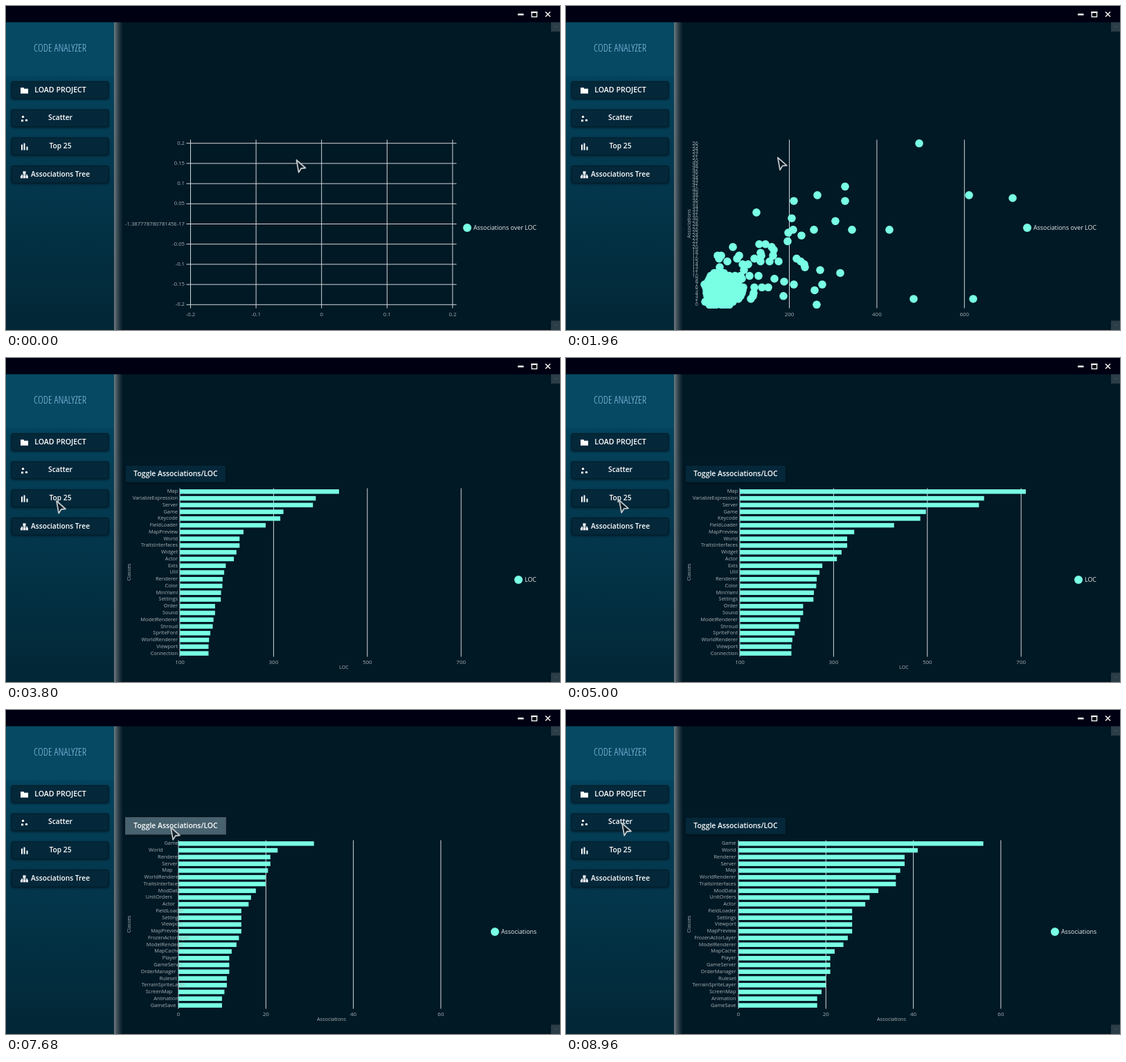
Animation of 800x469 px, one loop 9 s. Source, as an HTML page with a canvas:

```html
<!DOCTYPE html>
<html lang="en">
<head>
<meta charset="utf-8">
<title>Code Analyzer</title>
<style>
html, body { margin: 0; width: 100%; height: 100%; overflow: hidden; background: #011925; }
canvas { display: block; }
</style>
</head>
<body>
<canvas id="stage" width="800" height="469"></canvas>
<script>
const ctx = document.getElementById('stage').getContext('2d');
const LOOP = 9000, GROW = 300;
const MINT = '#79ffe4', GREY = '#a9b1b6', LINE = '#d0d6d9';
const SANS = '"Open Sans", "Noto Sans", sans-serif';
const SCATTER_AT = 876, BARS_VIEW_AT = 3430, BARS_AT = 3634, TOGGLE_AT = 7515;

const clamp = v => Math.max(0, Math.min(1, v));
const lerp = (a, b, p) => a + (b - a) * p;
const progress = (t, start, length = GROW) => clamp((t - start) / length);
const smooth = p => p * p * (3 - 2 * p);

function rect(x, y, w, h, fill) {
  ctx.fillStyle = fill;
  ctx.fillRect(x, y, w, h);
}
function line(x1, y1, x2, y2, color = LINE, width = 1) {
  ctx.strokeStyle = color;
  ctx.lineWidth = width;
  ctx.beginPath();
  ctx.moveTo(x1, y1);
  ctx.lineTo(x2, y2);
  ctx.stroke();
}
function dot(x, y, r, fill = MINT) {
  ctx.fillStyle = fill;
  ctx.beginPath();
  ctx.arc(x, y, r, 0, 7);
  ctx.fill();
}
function text(str, x, y, size, color = GREY, align = 'center', weight = 400) {
  ctx.font = `${weight} ${size}px ${SANS}`;
  ctx.fillStyle = color;
  ctx.textAlign = align;
  ctx.textBaseline = 'middle';
  ctx.fillText(str, x, y);
}
function sideTitle(str, y) {
  ctx.save();
  ctx.translate(178, y);
  ctx.rotate(-Math.PI / 2);
  text(str, 0, 0, 7.3);
  ctx.restore();
}
function faded(alpha, draw) {
  ctx.save();
  ctx.globalAlpha = alpha;
  draw();
  ctx.restore();
}
function gradient(x1, y1, x2, y2, from, to) {
  const g = ctx.createLinearGradient(x1, y1, x2, y2);
  g.addColorStop(0, from);
  g.addColorStop(1, to);
  return g;
}
function button(x, y, w, h, label, size) {
  ctx.save();
  ctx.shadowColor = 'rgba(0,8,14,.8)';
  ctx.shadowBlur = 4;
  ctx.shadowOffsetY = 1;
  ctx.fillStyle = '#04283a';
  ctx.beginPath();
  ctx.roundRect(x, y, w, h, 1.5);
  ctx.fill();
  ctx.restore();
  ctx.strokeStyle = '#021c29';
  ctx.lineWidth = 1;
  ctx.stroke();
  if (label) text(label, x + w / 2 + .5, y + h / 2, size, '#fff', 'center', 600);
}

// Window frame and sidebar
const icons = [
  y => {
    rect(21, y - 4, 5, 3, '#fff');
    rect(21, y - 2.5, 11, 7, '#fff');
  },
  y => [[24.5, -2.5], [23.5, 3], [29.5, 2.5]].forEach(([x, dy]) => dot(x, y + dy, 1.7, '#fff')),
  y => [[22, 8], [25.5, 10], [29.5, 5]].forEach(([x, h]) => rect(x, y + 5 - h, 2, h, '#fff')),
  y => {
    rect(24.5, y - 5, 4, 4, '#fff');
    [21, 24.8, 28.6].forEach(x => rect(x, y + 1.5, 3.2, 3.5, '#fff'));
    rect(26, y - 2, 1, 4, '#fff');
    rect(22, y, 9, 1, '#fff');
    rect(22, y, 1, 2, '#fff');
    rect(30, y, 1, 2, '#fff');
  }
];

function drawFrame() {
  rect(0, 0, 800, 469, '#011925');
  rect(156, 23, 13, 446, gradient(156, 0, 169, 0, 'rgba(150,156,160,.75)', 'rgba(90,100,106,0)'));
  rect(0, 101, 156, 368, gradient(0, 101, 0, 469, '#04435d', '#022635'));
  rect(0, 23, 156, 78, '#054963');
  rect(0, 0, 800, 23.5, '#000013');

  rect(739, 11, 8.5, 2.5, '#fff');
  ctx.strokeStyle = '#fff';
  ctx.lineWidth = 1.3;
  ctx.strokeRect(759.2, 8.7, 7.4, 7);
  rect(758.5, 8, 8.8, 2.2, '#fff');
  line(779, 8.5, 786, 15.5, '#fff', 1.4);
  line(786, 8.5, 779, 15.5, '#fff', 1.4);
  rect(787, 23.5, 13, 13.5, '#2b3d47');
  rect(787, 455.5, 13, 13.5, '#2b3d47');
  line(791.5, 31, 793.5, 29, '#465963');
  line(793.5, 29, 795.5, 31, '#465963');
  line(791.5, 461, 793.5, 463, '#465963');
  line(793.5, 463, 795.5, 461, '#465963');

  ctx.font = `300 condensed 10px ${SANS}`;
  const size = Math.min(15, 840 / ctx.measureText('CODE ANALYZER').width);
  text('CODE ANALYZER', 78, 62.5, size, '#8fc6ea', 'center', '300 condensed');
  ['LOAD PROJECT', 'Scatter', 'Top 25', 'Associations Tree'].forEach((label, i) => {
    const y = 109.5 + i * 40.7;
    button(8, y, 140, 24.5, label, i ? 10.2 : 10.6);
    icons[i](y + 12.7);
  });
}

function legend(label, x) {
  dot(x, 321, 6);
  text(label, x + 9, 321.5, 8.9, '#e8eef0', 'left');
}

// Scatter view: [x, associations] pairs plus a dense seeded cluster
const points = [
  [510, 56], [403, 41], [363, 38], [403, 36], [582, 38], [645, 37], [329, 36], [275, 32], [326, 30],
  [389, 29], [413, 26], [467, 26], [358, 26], [328, 26], [321, 25], [340, 24], [320, 22], [241, 20],
  [279, 21], [288, 21], [297, 20], [300, 19], [281, 18], [299, 17], [282, 17], [281, 15], [294, 15],
  [307, 15], [272, 16], [333, 16], [339, 15], [344, 14], [345, 13], [367, 12], [396, 11], [278, 10],
  [265, 10], [301, 9], [315, 8], [329, 7], [370, 7], [359, 5], [314, 3], [362, 0], [502, 2], [588, 2],
  [283, 6], [292, 6], [272, 6], [250, 17], [247, 16], [219, 17], [224, 17], [221, 16], [233, 15],
  [222, 13], [255, 14], [263, 14], [257, 12], [270, 3], [267, 2], [271, 4]
];
let seed = 11;
const random = () => (seed = seed * 16807 % 2147483647) / 2147483647;
const rowStart = [207, 201, 207, 204, 203, 203, 202, 200, 205, 207, 209, 214];
const rowEnd = [236, 241, 249, 252, 254, 255, 256, 246, 249, 254, 252, 228];
rowStart.forEach((from, v) => {
  for (let i = 0; i < 9; i++) {
    const spread = clamp((i + (i % 8 ? random() - .5 : 0)) / 8);
    points.push([lerp(from, rowEnd[v], spread ** 1.3), v]);
  }
});

function drawEmptyGrid(p) {
  const scaleX = v => lerp(455.7 + v * 946, 196 + v * .63, p);
  faded(1 - p, () => [-.2, -.1, 0, .1, .2].forEach(v => {
    line(scaleX(v), 193.5, scaleX(v), 437.5);
    text(String(v), scaleX(v), 446.5, 7.8);
  }));
  if (p > 0) return;
  ['0.2', '0.15', '0.1', '0.05', '-1.38777878078145E-17', '-0.05', '-0.1', '-0.15', '-0.2'].forEach((label, i) => {
    const y = 198.7 + i * 29.2;
    line(260.5, y, 650.5, y);
    text(label, 258, y, 7.7, GREY, 'right');
  });
}

function drawScatter(t) {
  const p = progress(t, SCATTER_AT);
  if (p < 1) drawEmptyGrid(p);
  if (p > 0) {
    faded(progress(t, SCATTER_AT + GROW), () => [200, 400, 600].forEach((v, i) => {
      const x = 322.5 + i * 126.4;
      line(x, 193.5, x, 437.5);
      text(v, x, 446.5, 8);
    }));
    for (let v = 0; v <= 56; v++) text(v, 191, 432.3 - v * 4.17, 7.7, '#98a2a8', 'right');
    sideTitle('Associations', 315);
    points.forEach(([x, v]) => dot(x, 432.3 - v * 4.17, 5.8 * p));
  }
  legend('Associations over LOC', 666);
}

// Bar views
const byLoc = {
  names: `Map VariableExpression Server Game Keycode FieldLoader MapPreview World TraitsInterfaces
    Widget Actor Exts Util Renderer Color MiniYaml Settings Order Sound ModelRenderer Shroud
    SpriteFont WorldRenderer Viewport Connection`.split(/\s+/),
  values: [710, 621, 610, 497, 485, 429, 344, 329, 329, 317, 307, 276, 270, 264, 263, 258, 257,
    235, 235, 229, 226, 217, 212, 210, 210],
  min: 100, left: 251, scale: .677, labelEnd: 248, ticks: [100, 300, 500, 700],
  title: 'LOC', titleX: 488, legendX: 740
};
const byLinks = {
  names: `Game World Renderer Server Map WorldRenderer TraitsInterfaces ModData UnitOrders Actor
    FieldLoader Settings Viewport MapPreview FrozenActorLayer ModelRenderer MapCache Player
    GameServer OrderManager Ruleset TerrainSpriteLayer ScreenMap Animation GameSave`.split(/\s+/),
  values: [56, 41, 38, 38, 37, 36, 36, 32, 30, 29, 26, 26, 26, 26, 25, 24, 22, 21, 21, 21, 20, 20,
    19, 18, 18],
  min: 0, left: 249, scale: 6.315, labelEnd: 245.5, ticks: [0, 20, 40, 60],
  title: 'Associations', titleX: 470, legendX: 706
};

function labelLeft(chart, i) {
  ctx.font = `400 7.4px ${SANS}`;
  return chart.labelEnd - ctx.measureText(chart.names[i]).width;
}

function drawBars(chart, p, previous = chart) {
  chart.ticks.forEach(v => {
    const x = chart.left + (v - chart.min) * chart.scale;
    line(x, 188.5, x, 432.5);
    text(v, x, 441, 8);
  });
  text(chart.title, chart.titleX, 448.5, 7.3);
  sideTitle('Classes', 310);
  chart.values.forEach((value, i) => {
    const y = 193.4 + i * 9.76;
    rect(chart.left, y - 3.3, (value - chart.min) * chart.scale * p, 6.5, MINT);
    // A renamed label slides from where the previous one began
    text(chart.names[i], lerp(labelLeft(previous, i), labelLeft(chart, i), p), y, 7.4, GREY, 'left');
  });
  legend(chart.title, chart.legendX);
}

function drawToggle(t) {
  button(172.5, 155.5, 144.5, 24.5);
  const glow = progress(t, TOGGLE_AT, 100) * (1 - progress(t, 7720));
  rect(172, 155, 146, 25.5, `rgba(255,255,255,${.27 * glow})`);
  text('Toggle Associations/LOC', 245, 168, 10.4, '#fff', 'center', 600);
}

// Pointer: [start, end, x, y] moves
const moves = [
  [40, 360, 410, 224],
  [1560, 2640, 72, 206],
  [4920, 5800, 237, 169],
  [8080, 8840, 80, 163]
];
function drawPointer(t) {
  let x = 418.5, y = 222;
  for (const [start, end, toX, toY] of moves) {
    const p = smooth(progress(t, start, end - start));
    x = lerp(x, toX, p);
    y = lerp(y, toY, p);
  }
  ctx.save();
  ctx.translate(x + 1, y + 1);
  ctx.beginPath();
  [[0, 0], [13, 11.5], [6.8, 12], [3.2, 17.8]].forEach(([px, py]) => ctx.lineTo(px, py));
  ctx.closePath();
  ctx.fillStyle = 'rgba(10,24,34,.75)';
  ctx.fill();
  ctx.strokeStyle = '#c3c8cb';
  ctx.lineWidth = 1.8;
  ctx.lineJoin = 'round';
  ctx.stroke();
  ctx.restore();
}

const begin = performance.now();
function render() {
  const t = (performance.now() - begin) % LOOP;
  drawFrame();
  if (t < BARS_VIEW_AT) {
    drawScatter(t);
  } else {
    if (t < TOGGLE_AT) drawBars(byLoc, progress(t, BARS_AT));
    else drawBars(byLinks, progress(t, TOGGLE_AT), byLoc);
    drawToggle(t);
  }
  drawPointer(t);
  requestAnimationFrame(render);
}
render();
</script>
</body>
</html>
```
